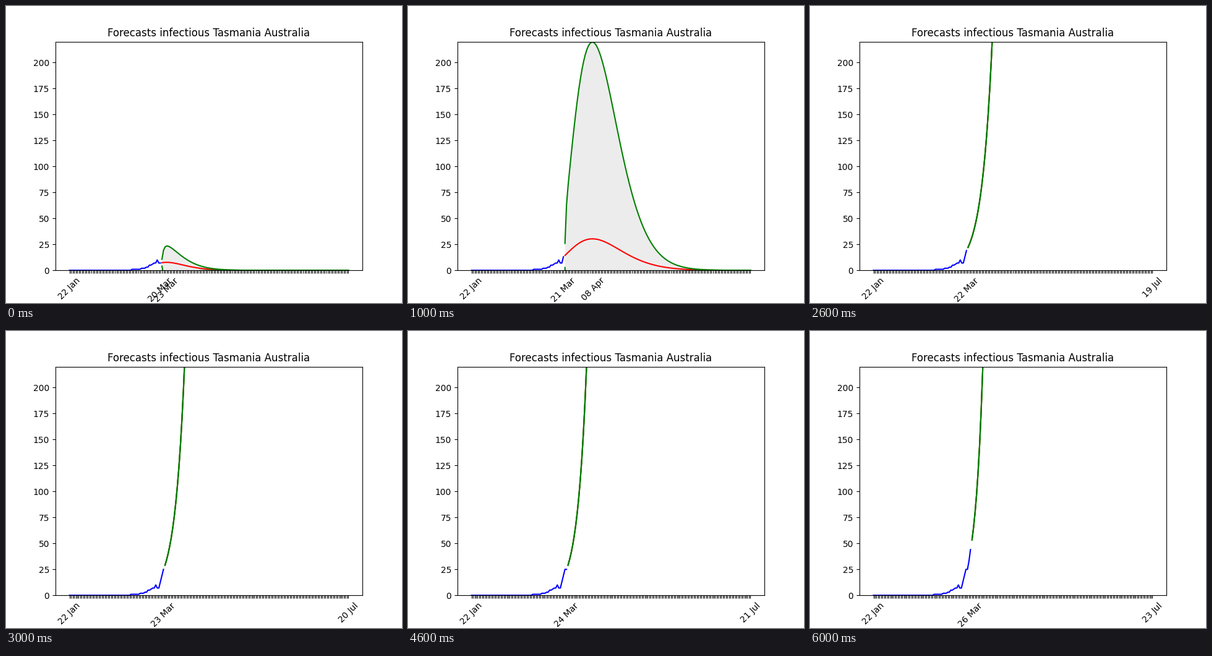
Recreate the animation shown at these times as a matplotlib script. Size 640x480 px, loop 7000 ms.

```python
import numpy as np
import matplotlib.pyplot as plt
from matplotlib.animation import FuncAnimation

HORIZON = 120
FIRST_MARCH_DAY = 20

# Daily case counts from 22 Jan: 40 empty days, then the rise in March.
CASES = np.array([0] * 40 + [1] * 6 + [2] * 3 + [3] * 2
                 + [5, 5, 6, 7, 7, 10, 7, 7, 13, 19, 25, 25, 33, 44])
FIRST_LAST = len(CASES) - 7

days = np.arange(HORIZON)


def hump(peak, when, width, power):
    """Skewed bell that reaches its peak at day `when`."""
    v = np.maximum(1 + (days - when) / width, 1e-9)
    return peak * np.exp(power * (np.log(v) - v + 1))


def small_outbreak():
    mid = hump(7.7, 3, 20, 4)
    spread = 1 + 1.5 * np.exp(-days / 12.5) - 2.05 * np.exp(-0.9 * days)
    return mid, mid * (1 + spread)


def large_outbreak():
    mid = hump(30.3, 17.6, 45, 7.14)
    rise = 1 - 0.45 * np.exp(-days / 5.5) - 0.28 * np.exp(-2 * days)
    return mid, hump(224, 16.8, 45, 9) * rise


def growth(start, rate):
    curve = np.minimum(start * np.exp(rate * days), 1000)
    return curve, curve


# Mean and upper bound, offset of the peak from the last known day, its label.
FORECASTS = [
    (small_outbreak(), 4, "23 Mar"),
    (large_outbreak(), 19, "08 Apr"),
    (growth(22.0, 0.1476), HORIZON, "19 Jul"),
    (growth(29.0, 0.1606), HORIZON, "20 Jul"),
    (growth(29.0, 0.168), HORIZON, "21 Jul"),
    (growth(38.5, 0.170), HORIZON, "22 Jul"),
    (growth(53.4, 0.199), HORIZON, "23 Jul"),
]

fig, ax = plt.subplots(figsize=(6.4, 4.8), dpi=100)


def draw(step):
    (mid, upper), offset, peak_label = FORECASTS[step]
    lower = 2 * mid - upper
    last = FIRST_LAST + step
    end = last + HORIZON
    future = last + 1 + days

    ax.clear()
    ax.plot(np.arange(last + 1), CASES[:last + 1], color="blue")
    ax.plot(future, mid, color="red")
    ax.plot(future, lower, color="green")
    ax.plot(future, upper, color="green")
    ax.fill_between(future, lower, upper, color="gray", alpha=0.15, linewidth=0)

    labels = [""] * (end + 1)
    labels[0] = "22 Jan"
    labels[last] = f"{FIRST_MARCH_DAY + step} Mar"
    labels[last + offset] = peak_label
    ax.set_xticks(range(end + 1), labels, rotation=45)
    ax.set_xlim(-0.05 * end, 1.05 * end)
    ax.set_ylim(0, 220)
    ax.set_title("Forecasts infectious Tasmania Australia")


anim = FuncAnimation(fig, draw, frames=len(FORECASTS), interval=1000, repeat=True)
plt.show()
```
